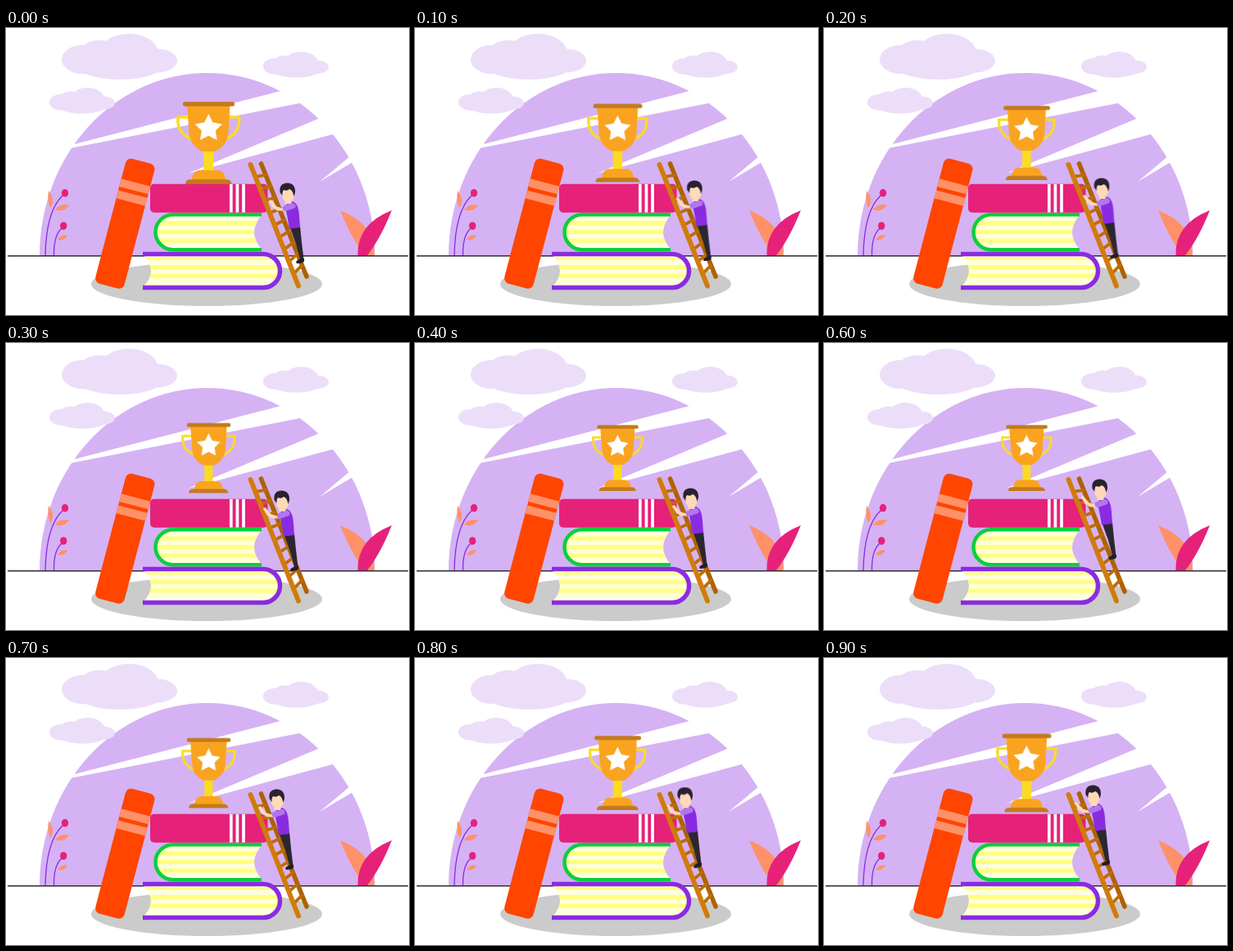
Write an HTML page that moves like this. It is 492 by 351 pixels and loops after 1100 ms.

```html
<!DOCTYPE html>
<html lang="en">
<head>
<meta charset="utf-8">
<title>Climbing to the trophy</title>
<style>
  html, body { margin: 0; width: 100%; height: 100%; overflow: hidden; background: #fff; }
  svg { display: block; width: 100%; height: 100%; }
  .trophy {
    transform-origin: 247.5px 141px;
    animation: pulse 1100ms infinite;
  }
  .climber { animation: climb 1100ms infinite; }

  @keyframes pulse {
    0% { transform: scale(1); animation-timing-function: steps(5); }
    45.45% { transform: scale(.75); animation-timing-function: steps(4); }
    81.81%, 100% { transform: scale(.95); }
  }
  @keyframes climb {
    0% { transform: translate(0, 0); animation-timing-function: steps(3); }
    27.27% { transform: translate(-7px, -9px); animation-timing-function: steps(2); }
    45.45% { transform: translate(-7px, -15px); animation-timing-function: steps(1); }
    54.54% { transform: translate(-7px, -23px); animation-timing-function: steps(1); }
    63.63% { transform: translate(-13px, -29px); animation-timing-function: steps(2); }
    81.81%, 100% { transform: translate(-15px, -34px); }
  }
</style>
</head>
<body>
<svg viewBox="0 0 492 351" xmlns="http://www.w3.org/2000/svg">
  <defs>
    <g id="cloud">
      <ellipse cx="93" cy="38.500" rx="25" ry="17.500"/>
      <ellipse cx="150" cy="31" rx="36" ry="24"/>
      <ellipse cx="114" cy="29" rx="23" ry="14"/>
      <ellipse cx="184" cy="40" rx="25" ry="14.500"/>
      <ellipse cx="139" cy="45" rx="53" ry="18"/>
    </g>
    <path id="leaf" d="M471 223Q428 240 429.500 278H441Q457 258 471 223Z"/>
    <clipPath id="greenPages">
      <path d="M312 229H205A20.500 20.500 0 0 0 205 270.500H312Q294 250 312 229Z"/>
    </clipPath>
    <clipPath id="violetPages">
      <path d="M167 277H313A20 20 0 0 1 313 317H167Q187 297 167 277Z"/>
    </clipPath>
  </defs>

  <rect width="492" height="351" fill="#fff"/>

  <!-- sky -->
  <path d="M41 278A204.700 223 0 0 1 450.400 278Z" fill="#d5b2f4"/>
  <g fill="#fff">
    <path d="M20 158.600L345 74.400L370 89.700Z"/>
    <path d="M222 178L390 107.200L408 127.600Z"/>
    <path d="M383 188L424 153.500L430 160Z"/>
  </g>
  <g fill="#ecdef9">
    <use href="#cloud"/>
    <use href="#cloud" transform="translate(275.400 25) scale(.567)"/>
    <use href="#cloud" transform="translate(14.400 69) scale(.567)"/>
  </g>

  <!-- plants -->
  <g fill="none" stroke="#8a2be2" stroke-width="1.300">
    <path d="M48 278Q49 224 69 205"/>
    <path d="M58.500 278Q58 254 68 245"/>
  </g>
  <g fill="#ff9168">
    <path d="M52 199Q61 211 54 220Q50 211 52 199Z"/>
    <path d="M60 222Q66 214 77 216.500Q71 226 60 222Z"/>
    <path d="M63 259Q67 252 75 253.500Q71 261 63 259Z"/>
    <use href="#leaf" transform="translate(879 0) scale(-1 1)"/>
  </g>
  <g fill="#e6217a">
    <ellipse cx="72" cy="201.800" rx="4.200" ry="4.800"/>
    <ellipse cx="70.200" cy="242" rx="4.200" ry="4.800"/>
    <use href="#leaf"/>
  </g>

  <ellipse cx="245" cy="313" rx="141" ry="27" fill="#cbcbcb"/>
  <path d="M2 278.800H491" stroke="#2e2b33" stroke-width="1.500"/>

  <!-- leaning book -->
  <g transform="translate(145.300 239.300) rotate(14.700)">
    <rect x="-18.300" y="-79" width="36.600" height="158" rx="7" fill="#ff4500"/>
    <path d="M-18.300 -47H18.300M-18.300 -32.300H18.300" stroke="#ff9168" stroke-width="10"/>
  </g>

  <!-- stacked books -->
  <rect x="176" y="190.700" width="143.500" height="35" rx="5" fill="#e6217a"/>
  <path d="M274.800 191V225.500M282.400 191V225.500M290 191V225.500" stroke="#fff" stroke-width="3.700"/>

  <g clip-path="url(#greenPages)">
    <rect x="180" y="226" width="135" height="48" fill="#ffffdc"/>
    <path d="M180 239H315M180 249.500H315M180 260H315" stroke="#ffff80" stroke-width="5"/>
  </g>
  <path d="M312 228.200H204A21.500 21.500 0 0 0 204 271.200H312" fill="none" stroke="#0bcf3b" stroke-width="4.500"/>

  <g clip-path="url(#violetPages)">
    <rect x="165" y="274" width="175" height="46" fill="#ffffdc"/>
    <path d="M165 292.500H340M165 303H340" stroke="#ffff80" stroke-width="5"/>
    <path d="M165 282H340" stroke="#ffff80" stroke-width="3"/>
  </g>
  <path d="M167 276.500H314A20.500 20.500 0 0 1 314 317.500H167" fill="none" stroke="#8a2be2" stroke-width="5.500"/>

  <!-- trophy -->
  <g class="trophy">
    <path d="M224 109H210Q208 130 230 137M271 109H284.500Q286.500 130 265 137" fill="none" stroke="#fbdc20" stroke-width="3.600"/>
    <rect x="241.300" y="148" width="12" height="28" fill="#fbdc20"/>
    <path d="M221 94H273.500L271.500 128Q270 144 255 151H239.500Q225 144 223.500 128Z" fill="#faa31f"/>
    <path d="M227 186Q228 174 237 174H258Q267 174 268 186Z" fill="#faa31f"/>
    <rect x="216" y="90.300" width="63" height="5.400" rx="2.500" fill="#c27a1c"/>
    <path d="M219 191Q219 185.300 225 185.300H269Q275 185.300 275.500 191Z" fill="#c27a1c"/>
    <path id="star" fill="#fff"/>
  </g>

  <!-- ladder -->
  <g fill="none" stroke-linecap="round">
    <path d="M311.500 166L367 304" stroke="#ad6204" stroke-width="5.600"/>
    <path id="rungs" stroke="#bd6c05" stroke-width="3.800"/>
    <path d="M298.500 167L357 315.500" stroke="#d17b0c" stroke-width="6"/>
  </g>

  <!-- climber -->
  <g class="climber">
    <path d="M334 221L327 219L323 212" fill="none" stroke="#ffd9b8" stroke-width="3" stroke-linecap="round" stroke-linejoin="round"/>
    <path d="M346 242H359L361 262L363.500 283H359L354 264Z" fill="#2b2731"/>
    <path d="M354 286Q357 282 364 282Q365 287 360 287.500L355 288Z" fill="#211d27"/>
    <path d="M341 219Q343 212 351 212.500Q357 215 358 229L359 244L346 245.500Q344 232 341 219Z" fill="#8a2be2"/>
    <rect x="340.500" y="207" width="8" height="8" fill="#ffd9b8"/>
    <ellipse cx="344.500" cy="204.500" rx="7.500" ry="8.500" fill="#ffd9b8"/>
    <path d="M334.500 201Q333 190 343.500 189.500Q353.500 190 353 201L351.500 206Q350 198 346 197Q343 200 339 198Q337 200 337.500 205Z" fill="#2a2230"/>
    <path d="M341 222L331 221.500L323 212" fill="none" stroke="#ffd9b8" stroke-width="3.400" stroke-linecap="round" stroke-linejoin="round"/>
    <path d="M350 217.500L341 220.500" stroke="#b176ec" stroke-width="7" stroke-linecap="round"/>
  </g>
</svg>
<script>
  const byId = id => document.getElementById(id);

  const starPoints = Array.from({ length: 10 }, (_, i) => {
    const a = Math.PI * i / 5;
    const r = i % 2 ? 8.9 : 17.6;
    return (247.3 + r * Math.sin(a)).toFixed(1) + ' ' + (122.8 - r * Math.cos(a)).toFixed(1);
  });
  byId('star').setAttribute('d', 'M' + starPoints.join('L') + 'Z');

  let rungs = '';
  for (let t = 0.1; t < 0.95; t += 0.1) {
    rungs += `M${298.5 + 58.5 * t} ${167 + 148.5 * t}L${311.5 + 55.5 * t} ${166 + 138 * t}`;
  }
  byId('rungs').setAttribute('d', rungs);
</script>
</body>
</html>
```
